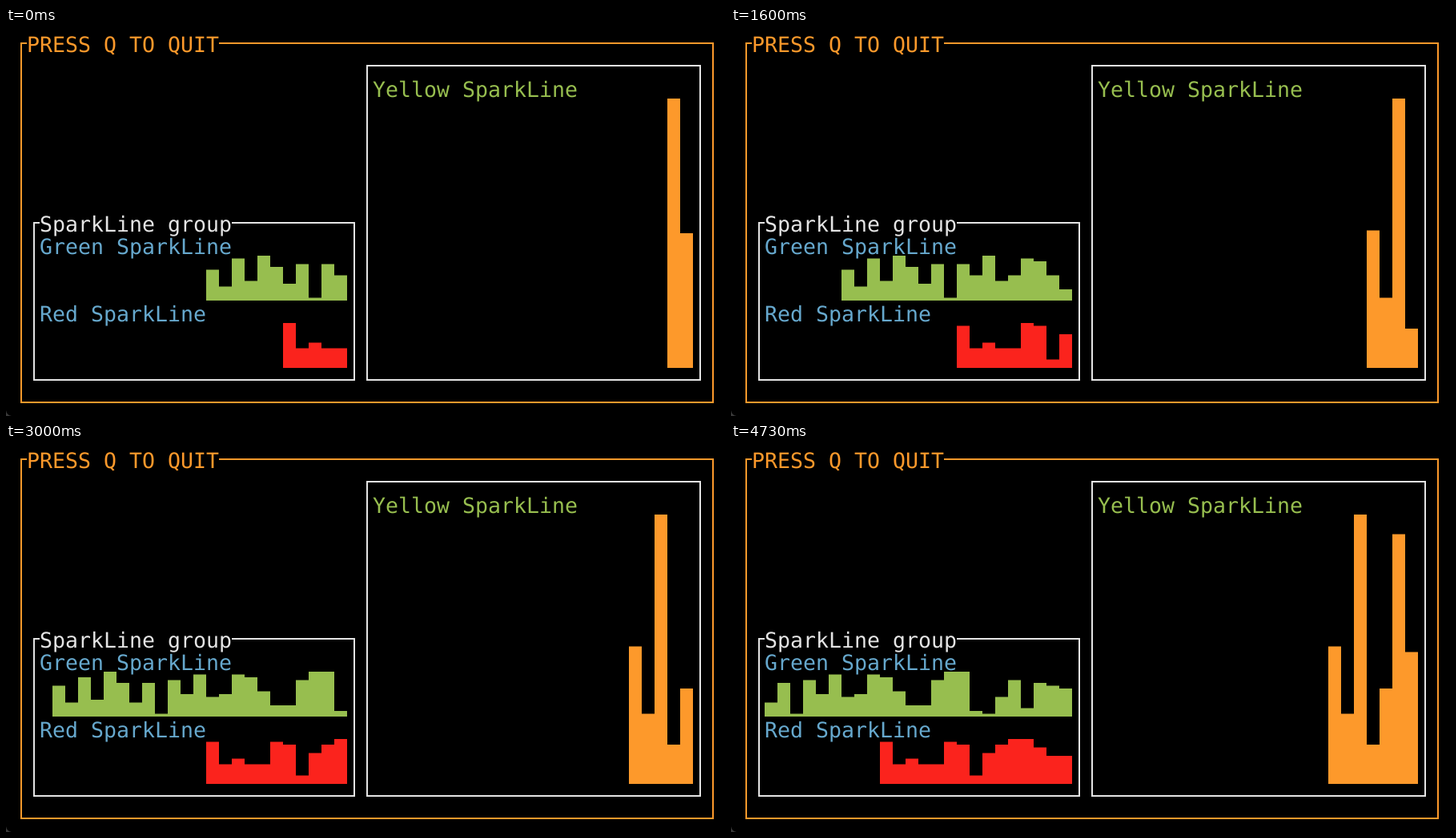
Animation of 898x484 px, one loop 4.79 s. Source, as an HTML page:

```html
<!DOCTYPE html>
<html lang="en">
<head>
<meta charset="utf-8">
<title>Sparklines</title>
<style>
  html, body { margin: 0; width: 100%; height: 100%; overflow: hidden; background: #000; }
  svg { display: block; width: 100%; height: 100%; }
  text {
    font: 26.576px "DejaVu Sans Mono", monospace;
    white-space: pre;
    text-rendering: geometricPrecision;
  }
  .frame { fill: none; stroke-width: 2; }
</style>
</head>
<body>
<svg viewBox="0 0 898 484">
  <rect width="898" height="484" fill="#000"/>
  <path d="M0 477Q1 483 7 484H0Z" fill="#3a3a3a"/>
  <path class="frame" stroke="#fd992b" d="M26 19H19V467H883V19H266"/>
  <path class="frame" stroke="#e4e4e4" d="M42 243H35V439H435V243H282"/>
  <path class="frame" stroke="#e4e4e4" d="M451 47H867V439H451Z"/>
  <text x="26" y="30" fill="#fd992b">PRESS Q TO QUIT</text>
  <text x="42" y="254" fill="#e4e4e4">SparkLine group</text>
  <text x="42" y="282" fill="#66a8cd">Green SparkLine</text>
  <text x="42" y="366" fill="#66a8cd">Red SparkLine</text>
  <text x="458" y="86" fill="#97be4f">Yellow SparkLine</text>
  <path id="green" fill="#97be4f"/>
  <path id="red" fill="#fb231d"/>
  <path id="yellow" fill="#fd992b"/>
</svg>
<script>
const LOOP = 4790, TICK = 250, PHASE = 50;
const CELL = 16, STEP = 3.5, COLS = 24;

// start: bars present at time zero; every: ticks per new bar
const lines = [
  {
    id: 'green', right: 426, base: 340, levels: 16, start: 11, every: 1,
    data: [11, 5, 14.4, 6.4, 15.6, 12, 5.4, 12.4, 1, 13, 8.4, 15.4, 7, 8.4, 15,
           14, 9, 4, 4, 13, 16, 16, 2, 1, 7, 13, 3, 12, 11, 10]
  },
  {
    id: 'red', right: 426, base: 424, levels: 16, start: 5, every: 2,
    data: [14.8, 6.8, 8.6, 6.8, 6.8, 15.4, 14.3, 3, 11.3, 14.3, 16, 16, 13, 10, 10]
  },
  {
    id: 'yellow', right: 858, base: 424, levels: 96, start: 2, every: 4,
    data: [49, 24.6, 96, 14, 34, 89, 47]
  }
];
for (const line of lines) line.el = document.getElementById(line.id);

function barsPath({ data, right, base, levels }, count) {
  const shown = data.slice(0, count);
  const max = Math.max(...shown);
  const bars = shown.slice(-COLS);
  let d = `M${right - bars.length * CELL} ${base}`;
  for (const v of bars) {
    d += `V${base - Math.round(v / max * levels) * STEP}h${CELL}`;
  }
  return d + `V${base}Z`;
}

function draw(t) {
  const ticks = Math.floor((t - PHASE) / TICK) + 1;
  for (const line of lines) {
    const count = Math.min(line.data.length, line.start + Math.ceil(ticks / line.every));
    if (count === line.count) continue;
    line.count = count;
    line.el.setAttribute('d', barsPath(line, count));
  }
}

const origin = performance.now();
function loop() {
  draw((performance.now() - origin) % LOOP);
  requestAnimationFrame(loop);
}
loop();
</script>
</body>
</html>
```
